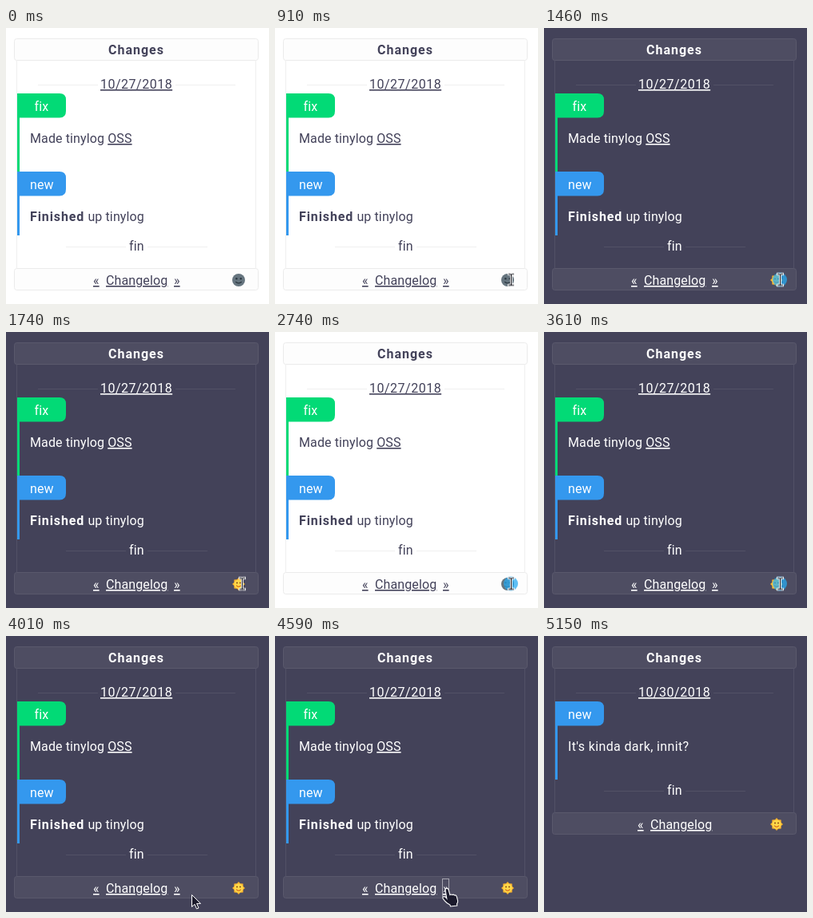
These frames come from a looping animation (329x346 px, 8520 ms). An HTML page:

```html
<!DOCTYPE html>
<html lang="en">
<head>
<meta charset="utf-8">
<title>Changes</title>
<style>
html, body { margin: 0; width: 100%; height: 100%; overflow: hidden; background: #fff; }
svg.stage {
  display: block; width: 329px; height: 346px;
  font: 16px Roboto, "Open Sans", sans-serif; letter-spacing: .12px;
}
.stage, .stage * { animation-duration: 8520ms; animation-iteration-count: infinite; }
.stage { animation-name: theme; animation-timing-function: step-end; }
.panel { stroke-width: 1; animation-name: panel; animation-timing-function: step-end; }
.rule { stroke-width: 1; fill: none; animation-name: rule; animation-timing-function: step-end; }
text { fill: currentColor; }
text.tag { fill: #fff; }
.b { font-weight: 700; letter-spacing: .9px; }
.date { letter-spacing: .5px; }
.quip { letter-spacing: .36px; }
.u { text-decoration: underline; text-underline-offset: 2px; text-decoration-thickness: 1px; }
.first, .second, .moon, .sun, .focus, .beam, .arrow, .hand { animation-timing-function: step-end; }
.first { animation-name: first; }
.second { animation-name: second; }
.moon { animation-name: moon; }
.sun { animation-name: sun; }
.focus { animation-name: focus; }
.beam { animation-name: beam; }
.arrow { animation-name: arrow; }
.hand { animation-name: hand; }
.pointer { animation-name: move; animation-timing-function: linear; }
.pulse { animation-name: pulse; animation-timing-function: linear; }

/* theme toggles at 1460, 2740 and 3610 ms */
@keyframes theme {
  0%, 32.16% { color: #43425a; background: #fff; }
  17.136%, 42.371%, 100% { color: #fff; background: #434259; }
}
@keyframes panel {
  0%, 32.16% { fill: #fdfdfd; stroke: #ebebeb; }
  17.136%, 42.371%, 100% { fill: #4e4d62; stroke: #5a596c; }
}
@keyframes rule {
  0%, 32.16% { stroke: #efefef; }
  17.136%, 42.371%, 100% { stroke: #525166; }
}
@keyframes moon {
  0%, 32.16% { visibility: visible; }
  17.136%, 42.371%, 100% { visibility: hidden; }
}
@keyframes sun {
  0%, 32.16% { visibility: hidden; }
  17.136%, 42.371%, 100% { visibility: visible; }
}
/* the next page opens at 4630 ms */
@keyframes first { 0% { opacity: 1; } 54.343%, 100% { opacity: 0; } }
@keyframes second { 0% { opacity: 0; } 54.343%, 100% { opacity: 1; } }
@keyframes focus { 0%, 54.343%, 100% { opacity: 0; } 53.873% { opacity: 1; } }

@keyframes beam { 0%, 44.48%, 100% { opacity: 0; } 9.39% { opacity: 1; } }
@keyframes arrow { 0%, 50.352%, 60.446%, 100% { opacity: 0; } 44.48%, 54.343% { opacity: 1; } }
@keyframes hand { 0%, 54.343%, 100% { opacity: 0; } 50.352% { opacity: 1; } }
@keyframes move {
  0%, 9.39% { transform: translate(297px, 320px); }
  10.681%, 43.779% { transform: translate(295px, 315.5px); }
  47.066%, 49.413% { transform: translate(232px, 324px); }
  50.822%, 56.69% { transform: translate(215px, 317px); }
  60.446%, 100% { transform: translate(222px, 348px); }
}
@keyframes pulse {
  0%, 17.135% { opacity: 0; }
  17.136%, 18% { opacity: .75; }
  20.423%, 32.159% { opacity: 0; }
  32.16%, 33.1% { opacity: .75; }
  34.977%, 42.37% { opacity: 0; }
  42.371%, 43.31% { opacity: .75; }
  45.188%, 54.342% { opacity: 0; }
  54.343%, 55.2% { opacity: .75; }
  57.63%, 100% { opacity: 0; }
}
</style>
</head>
<body>
<svg class="stage" viewBox="0 0 329 346">
  <defs>
    <g id="sunface">
      <path d="M0-8 L2-5.7 5.6-5.6 5.7-2 8 0 5.7 2 5.6 5.6 2 5.7 0 8-2 5.7-5.6 5.6-5.7 2-8 0-5.7-2-5.6-5.6-2-5.7Z" fill="#ffb52e"/>
      <circle r="5.6" fill="#ffd94a"/>
      <path d="M-3 1.7Q0 5 3 1.7" fill="none" stroke="#d8701c" stroke-width="1.2"/>
      <circle cx="-2" cy="-1.4" r="1" fill="#8a4a18"/>
      <circle cx="2" cy="-1.4" r="1" fill="#8a4a18"/>
    </g>
    <path id="tag" d="M0 0H53Q61 0 61 8V22Q61 30.5 53 30.5H0Z"/>
  </defs>

  <rect class="panel" x="10.5" y="13.5" width="305" height="27" rx="3"/>
  <text class="b" x="128" y="33" style="letter-spacing:1px">Changes</text>
  <path class="rule" d="M40 71.5H115M212 71.5H287"/>

  <g class="first">
    <path class="rule" d="M13.5 41V301M312.5 41V301M75 274.5H150M177 274.5H252"/>
    <text class="date u" x="118" y="76">10/27/2018</text>
    <g fill="#02da76">
      <rect x="14" y="82" width="3" height="98"/>
      <use href="#tag" x="14" y="82"/>
    </g>
    <g fill="#3498ee">
      <rect x="14" y="180" width="3" height="80"/>
      <use href="#tag" x="14" y="180"/>
    </g>
    <text class="tag" x="35.5" y="104">fix</text>
    <text x="30" y="144">Made tinylog <tspan class="u">OSS</tspan></text>
    <text class="tag" x="30" y="202">new</text>
    <text x="30" y="242"><tspan class="b">Finished</tspan> up tinylog</text>
    <text x="154" y="279">fin</text>
    <rect class="panel" x="10.5" y="301.5" width="305" height="27" rx="3"/>
    <text class="u" x="109" y="322">«</text>
    <text class="u" x="125" y="322">Changelog</text>
    <text class="u" x="210" y="322">»</text>
    <rect class="focus" x="209.5" y="304.5" width="8" height="22" fill="none" stroke="#fff" stroke-dasharray="1 1"/>
    <g transform="translate(291 316)">
      <g class="moon">
        <circle r="8" fill="#66757f"/>
        <circle cx="-2.6" cy="-1.8" r="1.2" fill="#2b3740"/>
        <circle cx="2.8" cy="-1.8" r="1.2" fill="#2b3740"/>
        <path d="M-3.8 2.2Q0 5.4 3.8 2.2" fill="none" stroke="#2b3740" stroke-width="1.2"/>
      </g>
      <g class="sun"><use href="#sunface"/></g>
    </g>
  </g>

  <g class="second">
    <path class="rule" d="M13.5 41V221M312.5 41V221M75 194.5H150M177 194.5H252"/>
    <text class="date u" x="118" y="76">10/30/2018</text>
    <g fill="#3498ee">
      <rect x="14" y="82" width="3" height="98"/>
      <use href="#tag" x="14" y="82"/>
    </g>
    <text class="tag" x="30" y="104">new</text>
    <text class="quip" x="30" y="144">It's kinda dark, innit?</text>
    <text x="154" y="199">fin</text>
    <rect class="panel" x="10.5" y="221.5" width="305" height="27" rx="3"/>
    <text class="u" x="117" y="242">«</text>
    <text class="u" x="133" y="242">Changelog</text>
    <use href="#sunface" x="291" y="236"/>
  </g>

  <g class="pointer">
    <circle class="pulse" r="9" fill="#28aaf0"/>
    <g class="beam" fill="none" stroke-linecap="square">
      <path d="M-2.5-7H-1Q.5-7 .5-5.5 .5-7 2-7H3.5M.5-5V6M-2.5 7H-1Q.5 7 .5 5.5 .5 7 2 7H3.5" stroke="#fff" stroke-width="3"/>
      <path d="M-2.5-7H-1Q.5-7 .5-5.5 .5-7 2-7H3.5M.5-5V6M-2.5 7H-1Q.5 7 .5 5.5 .5 7 2 7H3.5" stroke="#16161e" stroke-width="1.1"/>
    </g>
    <path class="arrow" d="M.5.5V15.5L4 12.3 6.5 18 9 17 6.6 11.4H11.5Z" fill="#1b1a2c" stroke="#fff"/>
    <path class="hand" d="M-2 1Q-1.6-.6 0-.6 1.6-.6 2.1 1L3.9 7.6Q5.2 6.4 6.7 7.5 8.3 6.6 9.4 8 11.4 7.4 12.2 9.4L13.6 14.6Q14 17 12.6 18.6L12.8 21 4.6 22 3.8 20Q0 18.5-2.6 15.2L-5-11.8 -5 12Q-5.6 10.2-3.8 9.8-2.2 9.6-.2 12Z" fill="#1b1a2c" stroke="#fff" stroke-width="1.1" style="d:path('M-2 1Q-1.6 -.6 0 -.6 1.6 -.6 2.1 1L3.9 7.6Q5.2 6.4 6.7 7.5 8.3 6.6 9.4 8 11.4 7.4 12.2 9.4L13.6 14.6Q14 17 12.6 18.6L12.8 21 4.6 22 3.8 20Q0 18.5 -2.6 15.2L-5 12Q-5.6 10.2 -3.8 9.8 -2.2 9.6 -.2 12Z')"/>
  </g>
</svg>
</body>
</html>
```
